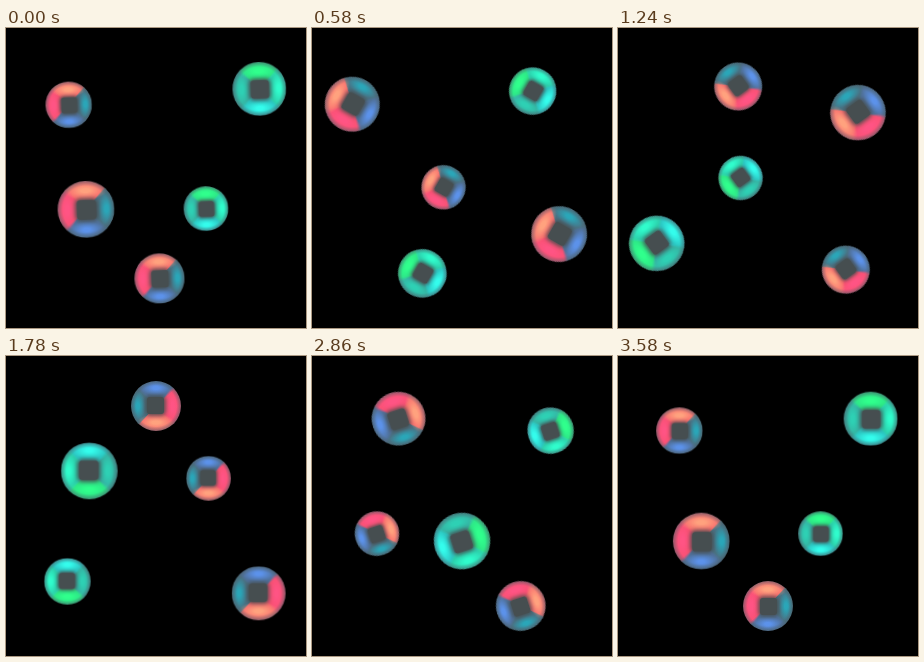
Write an HTML page without scripts that moves like this. It is 300 px wide and 300 px high and loops after 3600 ms.

```html
<!DOCTYPE html>
<html lang="en">
<head>
<meta charset="utf-8">
<title>Orbiting pearls</title>
<style>
  @property --turn {
    syntax: "<angle>";
    inherits: true;
    initial-value: 2deg;
  }

  html, body {
    margin: 0;
    width: 100%;
    height: 100%;
    overflow: hidden;
    background: #000;
  }

  .stage {
    position: relative;
    width: 300px;
    height: 300px;
    perspective: 800px;
    transform-style: preserve-3d;
    animation: turn 3600ms steps(180) -1ms infinite;
  }

  @keyframes turn {
    from { --turn: 2deg; }
    to { --turn: 362deg; }
  }

  /* Each pearl circles in depth while swinging sideways, out of phase with the rest.
     It mirrors a room: four lit walls around a dark square. */
  .pearl {
    --swing: calc(var(--turn) + var(--i) * 72deg);
    --orbit: calc(var(--turn) + var(--i) * 144deg);
    --top: #f8626a;
    --top-glow: #ffa27e;
    --left: #f8506e;
    --left-glow: #ff5484;
    --right: #4a7284;
    --right-glow: #2aa6b8;
    --bottom: #50729c;
    --bottom-glow: #5c92ea;
    position: absolute;
    left: 125px;
    top: 125px;
    width: 50px;
    height: 50px;
    border-radius: 50%;
    background:
      radial-gradient(closest-side, transparent 82%, rgb(75 95 105 / .6)),
      radial-gradient(38% 17% at 50% 17%, var(--top-glow) 20%, transparent),
      radial-gradient(17% 38% at 17% 50%, var(--left-glow) 20%, transparent),
      radial-gradient(15% 30% at 86% 50%, var(--right-glow) 20%, transparent),
      radial-gradient(30% 15% at 50% 86%, var(--bottom-glow) 20%, transparent),
      conic-gradient(from 45deg,
        var(--right) 4deg 86deg,
        var(--bottom) 94deg 176deg,
        var(--left) 184deg 266deg,
        var(--top) 274deg 356deg,
        var(--right));
    transform:
      translate3d(
        calc(100px * sin(var(--swing))),
        calc(100px * cos(var(--orbit))),
        calc(100px * sin(var(--orbit))))
      rotate(calc(-1 * var(--turn)));
  }

  .pearl::after {
    content: "";
    position: absolute;
    inset: 16.5px;
    border-radius: 3px;
    background: #464e50;
    box-shadow: 0 0 4px 1.5px #464e50;
  }

  .green {
    --top: #2cdc84;
    --top-glow: #30ff8c;
    --left: #38a89c;
    --left-glow: #2ed0b4;
    --right: #2cd0ac;
    --right-glow: #30fccc;
    --bottom: #2cc8c4;
    --bottom-glow: #34fcec;
  }
</style>
</head>
<body>
  <div class="stage">
    <div class="pearl" style="--i: 0"></div>
    <div class="pearl green" style="--i: 1"></div>
    <div class="pearl green" style="--i: 2"></div>
    <div class="pearl" style="--i: 3"></div>
    <div class="pearl" style="--i: 4"></div>
  </div>
</body>
</html>
```
